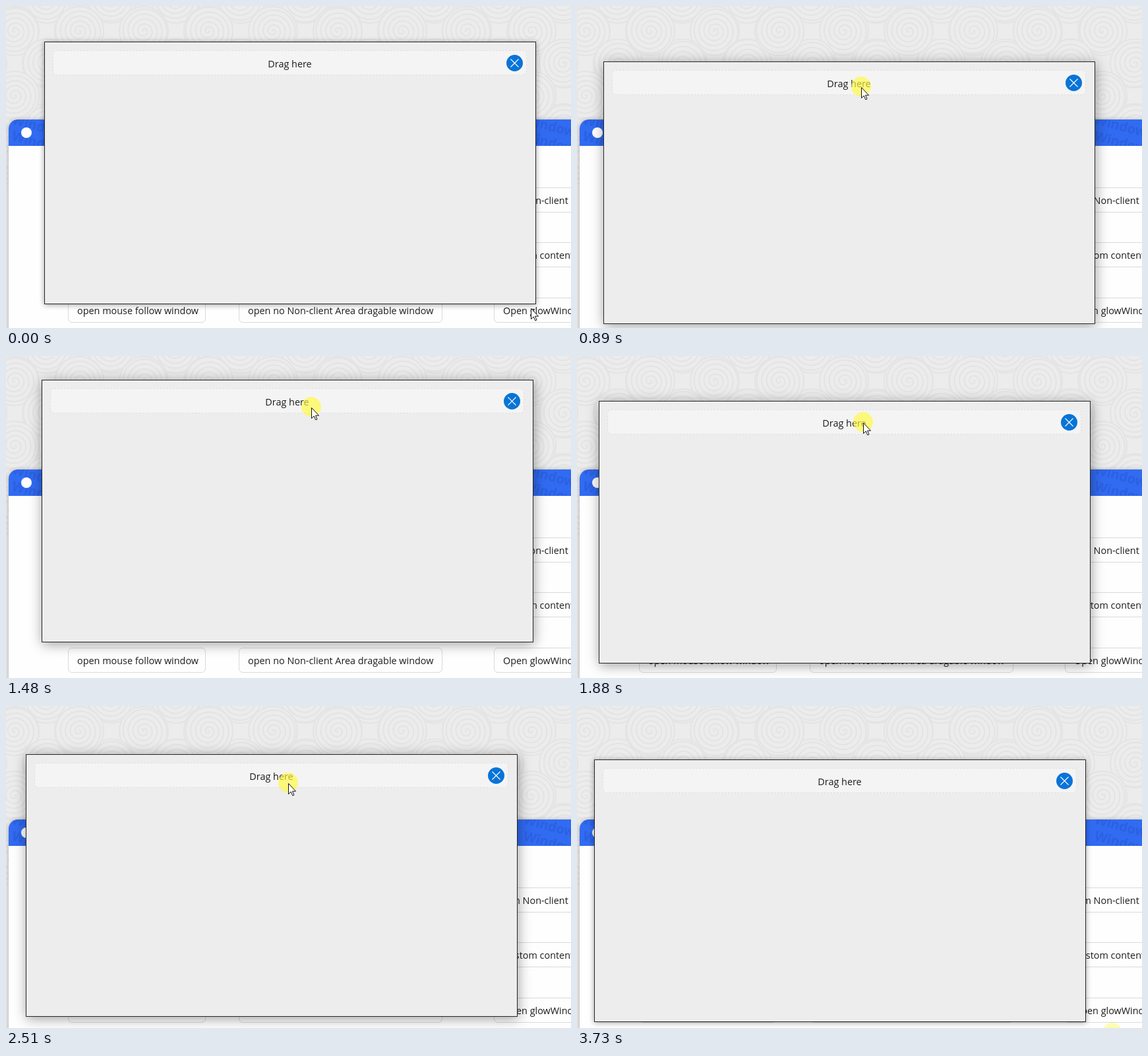
Write an HTML page with a canvas that moves like this. It is 857 px wide and 488 px high and loops after 3.8 s.

```html
<!DOCTYPE html>
<html lang="en">
<head>
<meta charset="utf-8">
<title>Draggable window</title>
<style>
  html, body { margin: 0; width: 100%; height: 100%; overflow: hidden; background: #ececec; }
  body { position: relative; font: 14.4px "Open Sans", "Noto Sans", sans-serif; color: #1c1c1c; }
  body * { position: absolute; box-sizing: border-box; }
  canvas { left: 0; top: 0; }
  #app {
    left: 4px; top: 172px; width: 900px; height: 400px;
    background: #fefefe; border-radius: 14px 14px 0 0; box-shadow: 0 1px 7px rgba(0, 0, 0, .3);
  }
  #bar {
    left: 0; top: 0; width: 900px; height: 40px; overflow: hidden;
    background: #316bf2; border-radius: 14px 0 0 0;
  }
  #bar span {
    font: bold 20px/20px "Open Sans", sans-serif;
    color: rgba(20, 50, 140, .17); transform: rotate(15deg); transform-origin: 0 16px;
  }
  #badge { left: 19px; top: 12px; width: 16px; height: 16px; border-radius: 50%; background: #fff; }
  .btn {
    height: 38px; padding: 0 13px; line-height: 37px; white-space: nowrap;
    background: #fefefe; border: 1px solid #dadada; border-radius: 6px;
  }
  #win {
    left: 0; top: 0; width: 746px; height: 398px;
    background: #ededed; border: 1px solid #262626;
    box-shadow: 0 1px 8px rgba(0, 0, 0, .38);
  }
  #win.active { box-shadow: 1px 3px 18px rgba(0, 0, 0, .38); }
  #grip {
    left: 12px; top: 12px; width: 719px; height: 38px; line-height: 39px; text-align: center;
    background: #f4f4f4; border: 1px dashed #dfdfdf; border-radius: 6px;
  }
  #close { left: 700px; top: 19px; width: 25px; height: 25px; }
  #glow {
    left: -15px; top: -16px; width: 30px; height: 30px; border-radius: 50%;
    background: rgba(255, 250, 60, .65);
  }
  #arrow { left: 0; top: 0; width: 14px; height: 22px; overflow: visible; }
</style>
</head>
<body>
<canvas id="swirls" width="857" height="488"></canvas>
<div id="app">
  <div id="bar"><div id="badge"></div></div>
</div>
<div class="btn" style="left:678px;top:275px;width:260px">open custom Non-client</div>
<div class="btn" style="left:704px;top:358px">open custom content window</div>
<div class="btn" style="left:94px;top:442px;width:209px">open mouse follow window</div>
<div class="btn" style="left:353px;top:442px;width:309px">open no Non-client Area dragable window</div>
<div class="btn" style="left:740px;top:442px">Open glowWindow</div>
<div id="win">
  <div id="grip">Drag here</div>
  <svg id="close" viewBox="0 0 25 25">
    <circle cx="12.5" cy="12.5" r="12.5" fill="#0874d8"/>
    <path d="M6.5 6.5l12 12m0-12l-12 12" stroke="#fff" stroke-width="1.1"/>
  </svg>
</div>
<div id="glow"></div>
<svg id="arrow" viewBox="0 0 14 22">
  <path d="M.5 .5V16.5L4.2 13L6.8 18.8L9 17.8L6.5 12.2H11.5Z" fill="#fff" stroke="#111"/>
</svg>
<script>
const LOOP = 3800, STEP = 64.4, LEAD = 11;
const GRAB = 10, DROP = 43, CLICK = 58;
const $ = id => document.getElementById(id);
const win = $('win'), glow = $('glow'), arrow = $('arrow');

// Turning points as [step, position]; each swing between two is a half cosine.
const winX = [[12.8, 58], [17.8, -72], [24.9, 79], [29.2, 33], [33, 61], [36, 61], [39.8, 26]];
const winY = [[9, 54], [14.8, 85], [22.8, 36], [27.3, 73], [33, 47], [36, 47], [40.4, 81]];
const enterX = [[0, 796], [9, 459]], enterY = [[0, 458], [9, 92]];
const leaveX = [[42.5, 427], [45, 422], [57, 812]], leaveY = [[42.5, 119], [54, 496]];

function swing(turns, k) {
  const i = turns.findIndex(t => t[0] > k);
  if (i < 0) return turns[turns.length - 1][1];
  if (i === 0) return turns[0][1];
  const [k0, a] = turns[i - 1], [k1, b] = turns[i];
  return a + (b - a) * (1 - Math.cos(Math.PI * (k - k0) / (k1 - k0))) / 2;
}

// While dragging, the window trails slightly behind the pointer.
function pointer(k) {
  if (k < GRAB) return [swing(enterX, k), swing(enterY, k)];
  if (k >= DROP) return [swing(leaveX, k), swing(leaveY, k)];
  return [swing(winX, k + .35) + 401, swing(winY, k + .7) + 38];
}

function place(el, [x, y]) {
  el.style.transform = `translate(${Math.round(x)}px, ${Math.round(y)}px)`;
}

function render(ms) {
  const k = Math.min(CLICK, Math.floor((ms % LOOP + LEAD) / STEP));
  const p = pointer(k);
  place(win, [swing(winX, k), swing(winY, k)]);
  place(arrow, p);
  place(glow, p);
  win.classList.toggle('active', k >= GRAB && k < CLICK);
  glow.style.opacity = k >= GRAB && k < DROP ? 1 : k === CLICK ? .6 : 0;
}

function swirl(g, x, y, r, turn) {
  const gap = 7.5;
  g.beginPath();
  g.arc(x, y, r, 0, 7);
  g.fill();
  g.stroke();
  g.beginPath();
  for (let a = 0; a <= r / gap; a += .03) {
    const q = a * Math.PI * 2 + turn;
    g.lineTo(x + a * gap * Math.cos(q), y + a * gap * Math.sin(q));
  }
  g.stroke();
}

// A close lattice of swirls, with a wider one laid over it.
function paintSwirls() {
  const g = $('swirls').getContext('2d');
  g.fillStyle = '#ececec';
  g.strokeStyle = '#e4e4e4';
  g.lineWidth = 2.2;
  for (const gap of [49, 98])
    for (let y = 38 - gap, row = 1; y < 240; y += gap, row++)
      for (let x = 111 - 4 * gap + (row & 1) * gap; x < 920; x += 2 * gap)
        swirl(g, x, y, 37, x + y);
}

function paintBar() {
  for (let i = 0; i < 9; i++)
    for (const y of [-11, 14]) {
      const word = document.createElement('span');
      word.textContent = 'Window';
      word.style.left = 4 + 97 * i + 'px';
      word.style.top = y + 'px';
      $('bar').prepend(word);
    }
}

paintSwirls();
paintBar();
const start = performance.now();
function tick() {
  render(performance.now() - start);
  requestAnimationFrame(tick);
}
tick();
</script>
</body>
</html>
```
